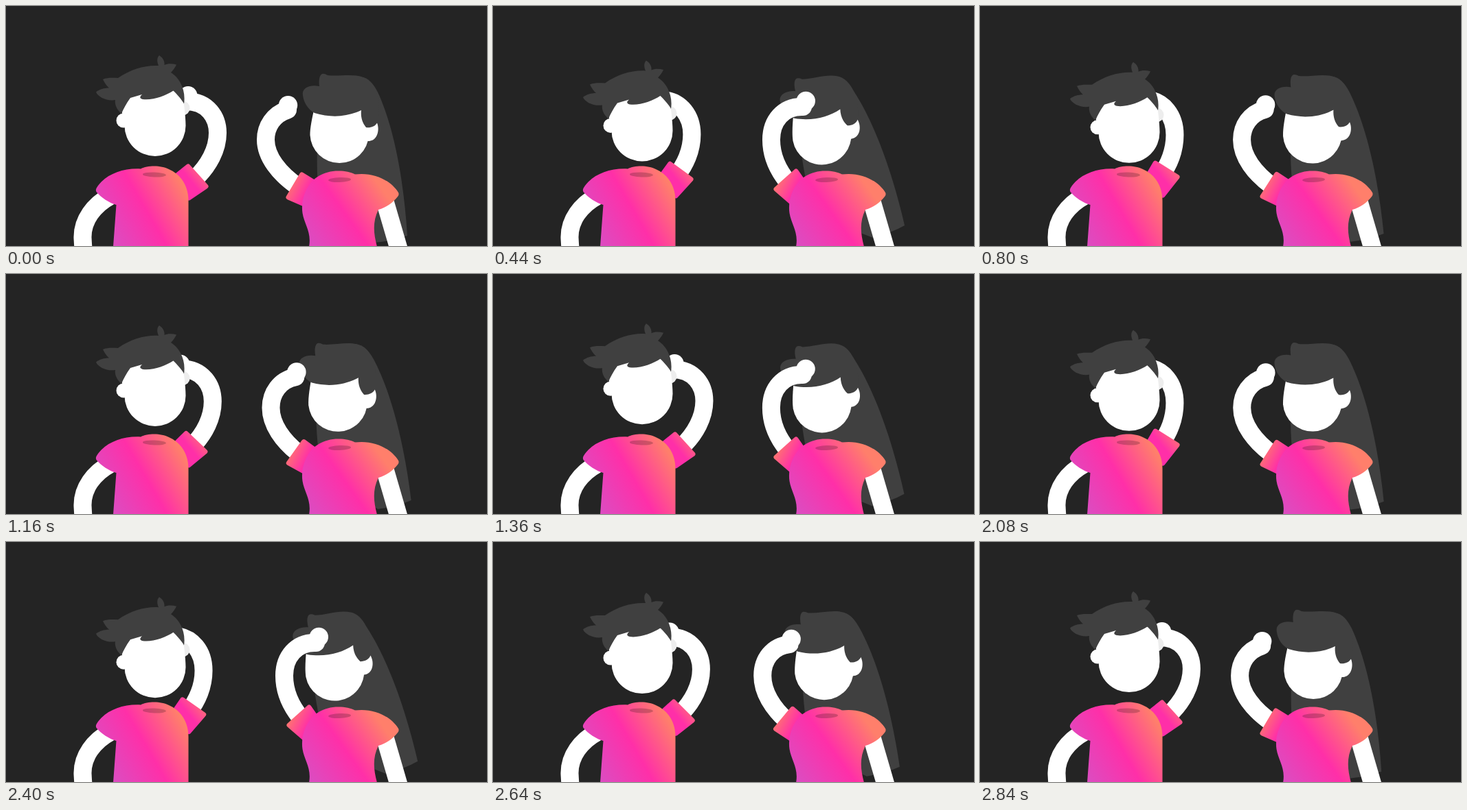
Write an HTML page that moves like this. It is 700 by 350 pixels and loops after 2.88 s.

```html
<!DOCTYPE html>
<html lang="en">
<head>
<meta charset="utf-8">
<title>Two people waving</title>
<style>
  html, body { margin: 0; width: 100%; height: 100%; overflow: hidden; background: #242424; }
  svg { display: block; width: 100%; height: 100%; }
  .hair { fill: #404040; }
  .skin { fill: #fff; }
  .arm { fill: none; stroke: #fff; stroke-width: 26; }
  .sleeve { stroke-width: 7; stroke-linejoin: round; }
  .collar { fill: #000; fill-opacity: .2; }
</style>
</head>
<body>
<svg viewBox="0 0 700 350">
  <defs>
    <linearGradient id="shirtA" gradientUnits="userSpaceOnUse" x1="148" y1="328" x2="258" y2="264">
      <stop offset="0" stop-color="#dd4bc0"/><stop offset=".5" stop-color="#ff2fa8"/><stop offset="1" stop-color="#ff7f6b"/>
    </linearGradient>
    <linearGradient id="shirtB" gradientUnits="userSpaceOnUse" x1="443" y1="343" x2="548" y2="268">
      <stop offset="0" stop-color="#dd4bc0"/><stop offset=".5" stop-color="#ff2fa8"/><stop offset="1" stop-color="#ff7f6b"/>
    </linearGradient>
    <linearGradient id="cuffA" gradientUnits="userSpaceOnUse" x1="268" y1="254" x2="290" y2="236">
      <stop offset="0" stop-color="#ff2fa8"/><stop offset="1" stop-color="#ff7a6e"/>
    </linearGradient>
    <linearGradient id="cuffB" gradientUnits="userSpaceOnUse" x1="438" y1="271" x2="413" y2="258">
      <stop offset="0" stop-color="#ff2fa8"/><stop offset="1" stop-color="#ff7371"/>
    </linearGradient>
  </defs>

  <g id="man">
    <path class="arm" d="M152 277C128 290 111 312 111.500 338C112 345 112 355 114 362"/>
    <path class="arm" id="armA"/>
    <circle class="skin" id="handA" r="13.5"/>
    <path class="sleeve" id="sleeveA" fill="url(#cuffA)" stroke="url(#cuffA)"/>
    <path fill="url(#shirtA)" d="M196 237.500C206 232 226 232 237 238C254 245 265.500 262 265.500 284V351H156L160.500 290C150 287 138 279 131.500 271Q130 268 132 265C143 247 168 236 196 237.500Z"/>
    <ellipse class="collar" cx="216" cy="246" rx="17" ry="3.500" transform="rotate(2 216 246)"/>
    <g id="headA">
      <circle cx="257" cy="149" r="10.500" fill="#ededed"/>
      <circle class="skin" cx="171" cy="167" r="10.500"/>
      <path class="skin" d="M172.500 174.500C172 165 169 158 168 152L178 130L257 122C258 140 261.500 158 261.500 174.500A44.500 44.500 0 0 1 172.500 174.500Z"/>
      <path class="hair" d="M131 125.500C136 121.500 143 119.500 150 119.500C146 116 143 111 141 107C148 104 156 105 163 105C182 92 202 86 222 87C219 80 220 75 223 72C229 76 231 81 230.500 86C236 83.500 242 84 248 85.500C246 90 243 94 240 97C253 105 262 123 259 142.500C256 137 250 130 243.500 123.500C232 131 213 138 199 136Q192 134 198 129L181 134C175 142 171 150 168 157C161 151 158 144 159 137C147 139 134 133 131 125.500Z"/>
    </g>
  </g>

  <g id="woman">
    <path class="hair" id="mane" d="M520 104C531 107 538 119 543 130C565 180 579 255 584 335Q562 343 535 345L460 300C453 270 452 240 453 205L480 130Z"/>
    <path class="arm" d="M550 280L573 359"/>
    <g id="headB">
      <path class="skin" d="M520 172L540 170.500C543 178 541.500 186 539 190C536 195 532 197 527 197H518Z"/>
      <path class="skin" d="M449 148C445 165 442.500 178 442.500 188.300A42.800 42.800 0 0 0 528 188.300V145Z"/>
      <path class="hair" d="M432 130C430 119 443 114 456 117C455 109 456 101 460 99Q463 98 468 101C485 103 505 98 520 104C532 108 539 122 542 136C543 150 543 162 540 170.500C537 176 530 178 524 177C518 170 516 161 517 152C499 161 474 164 449 156C440 151 433 141 432 130Z"/>
    </g>
    <path class="arm" id="armB" stroke-linecap="round"/>
    <circle class="skin" id="handB" r="13.7"/>
    <path class="sleeve" id="sleeveB" fill="url(#cuffB)" stroke="url(#cuffB)"/>
    <path fill="url(#shirtB)" d="M455 248C464 243 472 240.500 484 240.500C494 240.500 501 242 508 245.500C535 242 560 254 571 272Q572.500 275 570 278C563 287 553 294 542 297C533 315 535 332 540 351H441C445 330 434 318 431.500 302C428.500 282 438 258 455 248Z"/>
    <ellipse class="collar" cx="485.500" cy="253.500" rx="16.500" ry="3.500" transform="rotate(-2 485.500 253.500)"/>
  </g>
</svg>
<script>
  const BOB = 720, WAVE = 480;
  const el = id => document.getElementById(id);
  const lerp = (a, b, k) => a + (b - a) * k;
  const set = (id, attrs) => {
    for (const key in attrs) el(id).setAttribute(key, attrs[key]);
  };

  // Blend two paths that share the same commands.
  const blend = ([from, to], k) => {
    const ends = to.match(/-?[\d.]+/g);
    let i = 0;
    return from.replace(/-?[\d.]+/g, n => lerp(+n, +ends[i++], k).toFixed(2));
  };

  const easeInOut = x => x < .5 ? 2 * x * x : 1 - 2 * (1 - x) ** 2;
  const pingPong = (t, half) => {
    const x = t / half % 2;
    return easeInOut(x > 1 ? 2 - x : x);
  };
  // Sharpens the middle of a move, with a slight lead.
  const snap = (p, sharp, lead) =>
    p - sharp * Math.sin(2 * Math.PI * p) + lead * Math.sin(Math.PI * p);

  const poses = {
    armA: ['M262 139C294 139 308 163 308 185C308 209 295 233 275 252',
           'M236 136C268 136 283 162 283 188C283 210 275 232 262 248'],
    sleeveA: ['M250 246L265 234L291 263L266 280L250 270Z',
              'M247 243L255 229L287 249L266 276L250 268Z'],
    armB: ['M410 151.5C389 158 378 176 378 195C378 220 398 245 425 263.5',
           'M451 147C422 146 405 168 405 195C405 218 415 240 430 258'],
    sleeveB: ['M430.5 246L411 279L434 289L450 258Z',
              'M441 241L412 267L434 286L450 254Z']
  };

  function draw(t) {
    const bob = snap(pingPong(t, BOB), .03, .02);
    const turn = pingPong(t, WAVE);
    const wave = snap(turn, .13, .035);

    set('headA', { transform: `translate(0 ${10 * bob})` });
    set('handA', { cx: lerp(265, 226, bob), cy: lerp(130.5, 133, bob) });
    set('headB', { transform: `rotate(${-8 * turn} 500 236)` });
    set('mane', { transform: `rotate(${-9.5 * turn} 500 236)` });
    set('handB', { cx: lerp(410.5, 455.3, wave), cy: lerp(144.7, 138.5, wave) });
    for (const id in poses) {
      set(id, { d: blend(poses[id], id.endsWith('A') ? bob : wave) });
    }
  }

  const start = performance.now();
  function tick() {
    draw((performance.now() - start) % (4 * BOB));
    requestAnimationFrame(tick);
  }
  tick();
</script>
</body>
</html>
```
